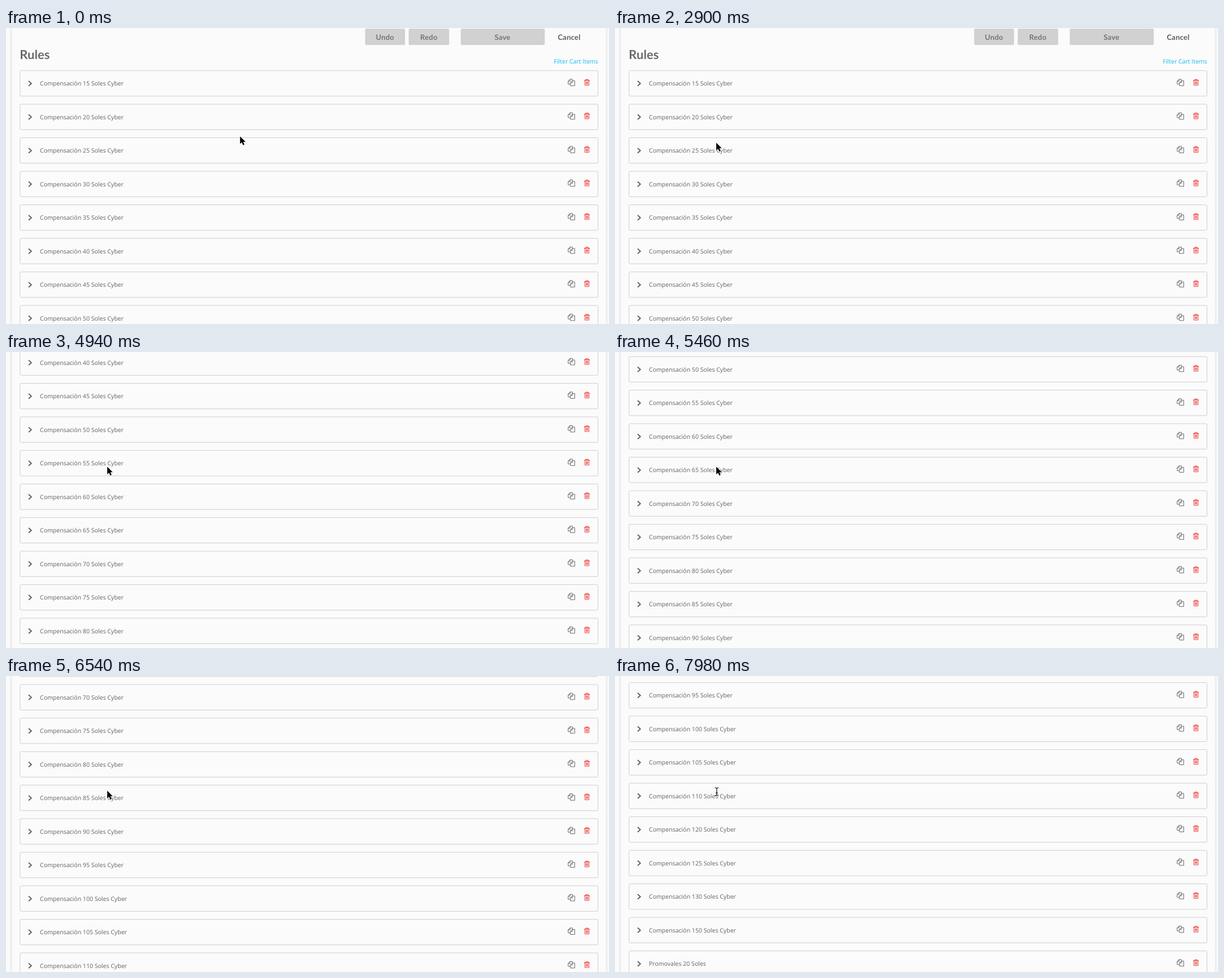
An HTML page that plays this animation: 1066x525 px, repeating every 8 s.

```html
<!DOCTYPE html>
<html lang="en">
<head>
<meta charset="utf-8">
<title>Rules</title>
<style>
  html, body { margin: 0; width: 100%; height: 100%; overflow: hidden; background: #fafafa; }
  svg { display: block; width: 1066px; height: 525px; }
  text { font: 10.56px "Open Sans", "Noto Sans", sans-serif; fill: #626262; text-rendering: geometricPrecision; }
  .head { font: 700 22px Lato, sans-serif; fill: #6b6b6b; }
  .btn { font: 700 13px Lato, sans-serif; letter-spacing: .2px; fill: #757575; text-anchor: middle; }
  .link { fill: #0fbdf2; text-anchor: end; }
  .box { fill: #fbfbfb; stroke: #cecece; }
  .line { fill: none; stroke: #666; }
</style>
</head>
<body>
<svg id="stage" viewBox="0 0 1066 525">
  <defs>
    <g id="copy" class="line" stroke-linejoin="round">
      <path d="M997.6 99.6H993.8V94.2L997.2 90.9H1001.3V93.4M997.2 90.9V94.2H993.8"/>
      <path d="M1001.2 93.6H1005.4V102.4H997.8V97ZM1001.2 93.6V97H997.8"/>
    </g>
    <g id="trash" fill="none" stroke="#ee3b37">
      <path d="M1022 93.1H1032M1025 92.8V91.3H1029V92.8" stroke-width="1.1"/>
      <path d="M1023.3 93.5V101.6H1030.7V93.5M1025.5 95V100M1027 95V100M1028.5 95V100" stroke-width=".95"/>
    </g>
  </defs>
  <rect x="9" y="-10" width="1053" height="545" fill="#fbfbfb" stroke="#ededed" stroke-width="3"/>
  <g id="page">
    <g fill="#d1d1d1" stroke="#c8c8c8" stroke-width=".6">
      <rect x="635.3" y="1.5" width="69.7" height="28.2" rx="1.5"/>
      <rect x="712.3" y="1.5" width="70.7" height="28.2" rx="1.5"/>
      <rect x="804.3" y="1.5" width="147.7" height="28.2" rx="1.5"/>
    </g>
    <text class="btn" x="670" y="21.3">Undo</text>
    <text class="btn" x="747.6" y="21.3">Redo</text>
    <text class="btn" x="877.8" y="21.3">Save</text>
    <text class="btn" x="995.6" y="21.3" style="fill:#5c5c5c">Cancel</text>
    <text class="head" x="24.3" y="54.6">Rules</text>
    <text class="link" x="1046.7" y="63">Filter Cart Items</text>
    <g id="rows"></g>
  </g>
  <g id="cursor">
    <path id="arrow" d="M0 0V13.4L3.1 10.6L5.3 15.6L7.7 14.6L5.5 9.8H9.7Z" fill="#000" stroke="#fff" stroke-width="1" paint-order="stroke"/>
    <path id="beam" d="M-2.4 -5.4Q0 -5.4 .9 -4V7Q0 8.6 -2.4 8.6M4.2 -5.4Q1.8 -5.4 .9 -4M4.2 8.6Q1.8 8.6 .9 7M-1 3.9H2.8" fill="none" stroke="#111" stroke-width="1.2"/>
  </g>
</svg>
<script>
const LOOP = 8000, PITCH = 59.5, ROW_H = 45.2;
const el = id => document.getElementById(id);

const amounts = Array.from({ length: 20 }, (_, i) => 15 + 5 * i).concat(120, 125, 130, 150);
const labels = amounts.map(n => `Compensación ${n} Soles Cyber`).concat('Promovales 20 Soles');

el('rows').innerHTML = labels.map((label, i) => `
  <g transform="translate(0 ${i * PITCH})">
    <rect class="box" x="24.9" y="75.6" width="1021.6" height="${ROW_H}" rx="2"/>
    <path class="line chevron" d="M40 94L44.8 98.4L40 102.8" stroke-width="2"/>
    <text x="60" y="102.3">${label}</text>
    <use href="#copy"/><use href="#trash"/>
  </g>`).join('');

const rows = [...el('rows').children];
const firstBox = rows[0].querySelector('rect');
const firstChevron = rows[0].querySelector('.chevron');

// n evenly spaced times from a to b
const spread = (a, b, n) => Array.from({ length: n }, (_, i) => a + (b - a) * i / (n - 1));
const easeOut = f => 1 - (1 - f) ** 2;

// Append eased steps from the last value of a track to a new value
function glide(track, times, to) {
  const from = track[track.length - 1].v;
  times.forEach((t, i) => {
    const f = easeOut((i + 1) / times.length);
    track.push({ t, v: from.map((a, k) => a + (to[k] - a) * f) });
  });
}

const at = (track, t) => track.reduce((v, step) => step.t <= t ? step.v : v, track[0].v);

const pointer = [{ t: 0, v: [413.8, 192.2] }];
glide(pointer, [90, 180, 270], [153, 142.5]);
glide(pointer, spread(450, 990, 9), [32, 88.5]);
glide(pointer, [2280], [36, 94.5]);
glide(pointer, [2720, 2810, 2900], [179, 203.5]);

const scroll = [{ t: 0, v: [0] }];
glide(scroll, [...spread(3350, 4040, 8), 4130], [195.92]);
glide(scroll, [...spread(4240, 4940, 8), 5020], [379.26]);
glide(scroll, [...spread(5110, 5460, 5), 5550, 5640, 5740, 5840], [509.78]);
glide(scroll, [...spread(5960, 6540, 7), 6620, 6710], [725.66]);
glide(scroll, spread(6830, 7300, 6), [872]);
glide(scroll, spread(7570, 7980, 5), [1016]);

function draw(t) {
  const open = t >= 1170 && t < 2370;
  const typing = t >= 7980;
  const [x, y] = at(pointer, t);
  el('page').setAttribute('transform', `translate(0 ${-at(scroll, t)[0]})`);
  el('cursor').setAttribute('transform', `translate(${x} ${y})`);
  el('arrow').style.display = typing ? 'none' : '';
  el('beam').style.display = typing ? '' : 'none';
  firstBox.setAttribute('height', open ? 500 : ROW_H);
  firstChevron.setAttribute('transform', open ? 'rotate(90 42.4 98.4)' : '');
  rows.slice(1).forEach(row => row.style.display = open ? 'none' : '');
}

const start = performance.now();
function tick() {
  draw((performance.now() - start) % LOOP);
  requestAnimationFrame(tick);
}
tick();
</script>
</body>
</html>
```
